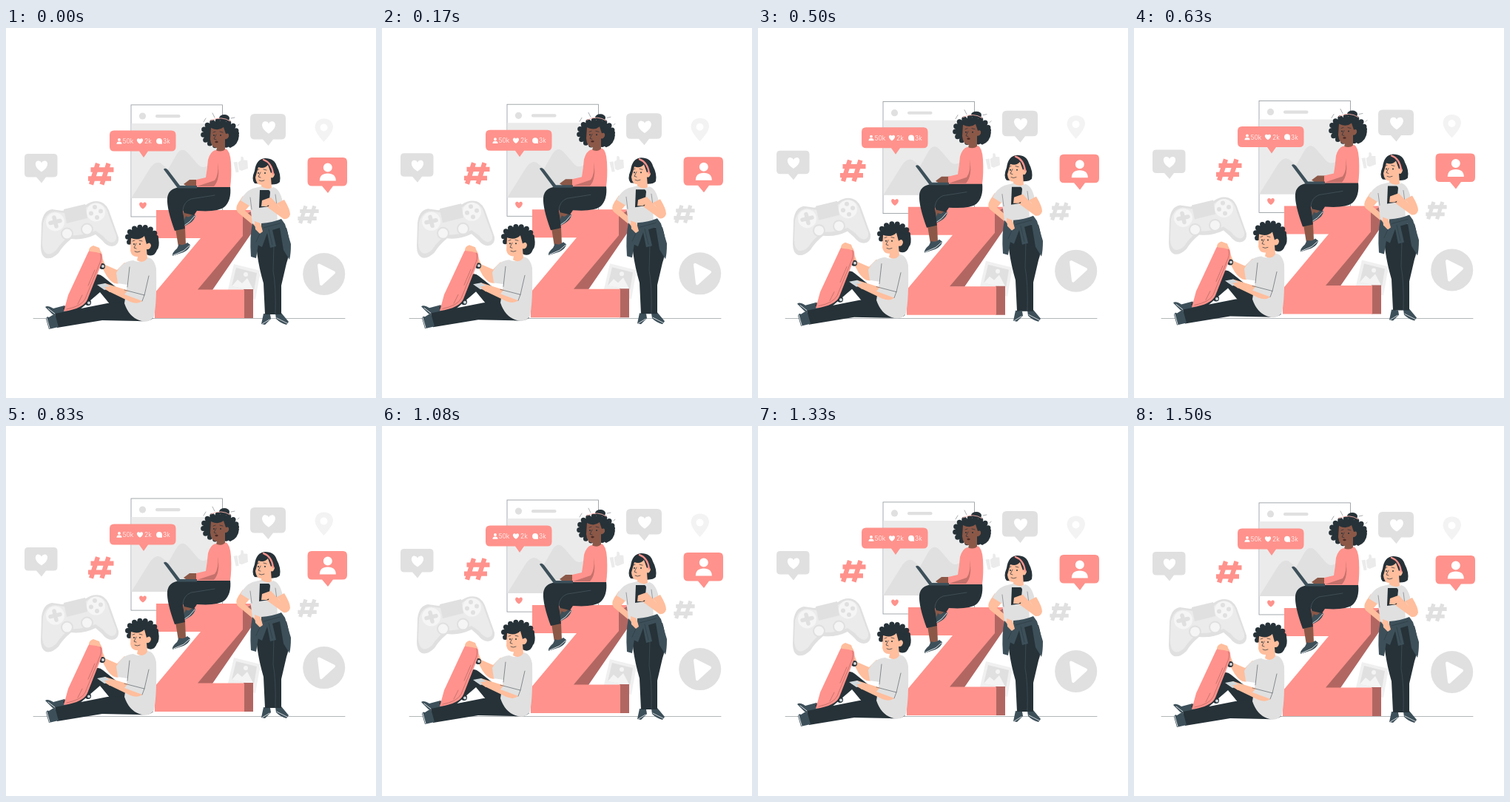
Animation, 500 px wide and 500 px high, one loop 1.54 s. Source, as an HTML page:

```html
<!DOCTYPE html>
<html lang="en">
<head>
<meta charset="utf-8">
<title>Generation Z</title>
<style>
html, body { margin: 0; width: 100%; height: 100%; overflow: hidden; background: #fff; }
svg { display: block; width: 100vw; height: 100vh; }
path, ellipse { stroke-linecap: round; stroke-linejoin: round; }
.pink { fill: #ff928c; }
.shade { fill: #b26662; }
.dark { fill: #263238; }
.slate { fill: #3d505a; }
.hair { fill: #263238; }
.gray { fill: #e0e0e0; }
.pale { fill: #ebebeb; }
.white { fill: #fff; }
.skin { fill: #ffbe9d; }
.brown { fill: #8b5848; }
.line { fill: none; stroke: #263238; stroke-width: .7; }
.curl { stroke: #263238; stroke-width: 7; stroke-dasharray: 0 7.5; }
text { font: 300 8.6px Inter, sans-serif; fill: #fff; }
</style>
</head>
<body>
<svg viewBox="0 0 500 500">
<defs>
  <path id="heart" d="M0 8C-13 0-9-9-4-8Q-1-8 0-5Q1-8 4-8C9-9 13 0 0 8Z"/>
  <path id="user" d="M0-15A6 6 0 0 1 0-3A6 6 0 0 1 0-15ZM-11 9Q-11-1 0-1Q11-1 11 9Z"/>
  <path id="hash" d="M14 0L5 28.500M28.500 0L19.500 28.500M4.500 8.500H35.500M1 20.500H32" fill="none" stroke-width="6.300" style="stroke-linecap:butt"/>
</defs>

<path class="line" stroke-opacity=".5" d="M37 392.500H458"/>

<g id="scene">
  <!-- post card -->
  <rect x="169" y="103.900" width="123.500" height="151.100" fill="#fff" stroke="#8d9498" stroke-width=".8"/>
  <circle class="gray" cx="184.500" cy="119" r="4.600"/>
  <rect class="gray" x="202" y="117" width="33.500" height="4.200" rx="2"/>
  <path class="pale" d="M169.500 129H292V230H169.500Z"/>
  <path class="gray" d="M170 229L195 189Q204 177 212 185L219 191L231 170Q238 160 246 169L259 184Q266 192 275 184L292 208V230H170Z"/>
  <use href="#heart" class="pink" transform="translate(185 240) scale(.56)"/>

  <!-- bubbles -->
  <path class="gray" d="M30 170H64.500Q69.500 170 69.500 175V196.500Q69.500 201.500 64.500 201.500H54L48 209.500L41 201.500H30Q25 201.500 25 196.500V175Q25 170 30 170Z"/>
  <use href="#heart" class="white" transform="translate(48 187) scale(.93)"/>
  <path class="gray" d="M336 116H372Q378 116 378 122V144.500Q378 150.500 372 150.500H361L354.500 159L347 150.500H336Q330 150.500 330 144.500V122Q330 116 336 116Z"/>
  <use href="#heart" class="white" transform="translate(355 134.500) scale(1.02)"/>
  <path class="pink" d="M413 175H455.500Q461 175 461 181V207.500Q461 213.500 455 213.500H442L435 223L427 213.500H413.500Q407.500 213.500 407.500 207.500V181Q407.500 175 413 175Z"/>
  <use href="#user" class="white" transform="translate(434.800 197.500)"/>
  <path class="pink" d="M146 138.500H223.500Q229.500 138.500 229.500 144.500V160.500Q229.500 166.500 223.500 166.500H192L186 175L180 166.500H146Q140 166.500 140 160.500V144.500Q140 138.500 146 138.500Z"/>
  <use href="#user" class="white" transform="translate(153 153.800) scale(.32)"/>
  <use href="#heart" class="white" transform="translate(181 153) scale(.47)"/>
  <circle class="white" cx="207" cy="152.800" r="3.900"/>
  <path class="white" d="M207 156L211 157L210.500 152Z"/>
  <text x="157.500" y="156.200">50k</text>
  <text x="187" y="156.200">2k</text>
  <text x="212" y="156.200">3k</text>

  <use href="#hash" stroke="#ff928c" transform="translate(110 183)"/>
  <use href="#hash" stroke="#e0e0e0" transform="translate(393.500 240.500) scale(.82)"/>
  <path fill="#f3f3f3" fill-rule="evenodd" d="M429.500 122.500Q442 123 442 134.500Q441 142 429.500 154Q418 142 417.500 134.500Q418 123 429.500 122.500ZM429.500 129.500A5 5 0 1 0 429.500 139.500A5 5 0 1 0 429.500 129.500Z"/>
  <circle class="gray" cx="429.700" cy="332.500" r="28.500"/>
  <path fill="#fff" stroke="#fff" stroke-width="4" d="M423 320.500L443 330.500L426 346Z"/>
  <path class="pale" transform="rotate(-9 318 184)" d="M308 180H313V194H309ZM314 181L318 179L319 174Q323 173 322 179L327 180L326 191L317 193L314 191Z"/>

  <!-- gamepad -->
  <path class="gray" d="M48 264Q50 247 62 245L76 247L108 239Q118 232 128 235Q137 238 141 252L152 283Q153 294 143 295Q136 295 130 287L121 279Q105 287 88 285Q77 294 71 304Q62 313 54 311Q47 308 47 296Z"/>
  <path class="pale" d="M50 264Q54 249 66 248L78 250L108 243Q118 235 128 238Q136 241 139 254L149 281Q150 289 143 290Q137 289 131 281L121 274Q105 281 87 280Q75 289 68 300Q61 307 55 305Q49 302 49 290Z"/>
  <path class="gray" d="M78 245L107 238L110 257L82 264Z"/>
  <circle cx="66.500" cy="262" r="12.500" fill="#f5f5f5"/>
  <circle cx="121.500" cy="249" r="12.500" fill="#f5f5f5"/>
  <path d="M60 263.500L73 260.500M65 256L68 268" stroke="#e0e0e0" stroke-width="5.500"/>
  <g class="gray"><circle cx="120" cy="242" r="3"/><circle cx="115" cy="250.500" r="3"/><circle cx="128" cy="247.500" r="3"/><circle cx="123" cy="256" r="3"/></g>
  <g fill="#f5f5f5" stroke="#e0e0e0" stroke-width="2"><circle cx="82.500" cy="278" r="7.500"/><circle cx="109.500" cy="272" r="7.500"/></g>

  <!-- snapshot and letter -->
  <path fill="#f0f0f0" d="M308 319L344 328L337 367L299 358Z"/>
  <path class="gray" d="M311 324L339 331L335 355L305 349Z"/>
  <path fill="#f4f4f4" d="M305 349L313 340L319 345L326 338L335 355Z"/>
  <circle cx="324" cy="333" r="3" fill="#f4f4f4"/>
  <path class="shade" d="M319 254L334 246V274L279 354H258ZM321 353H334V392H321Z"/>
  <path class="pink" d="M203 246H333L320 255V281L259 353.500H322V392H201V358L263 284H203Z"/>

  <!-- woman with laptop -->
  <path class="brown" d="M240 246H255L249 260L239 265ZM229 271H242L243 292L233 296Z"/>
  <path class="slate" d="M234 272Q233 268 240 261L243 254Q247 258 252 251L256 253Q255 260 248 264ZM225 308Q224 304 231 298L234 292Q239 295 245 290L249 293Q248 299 240 303Z"/>
  <path d="M235 271L248 262L255 254M226 307L240 301L248 294" fill="none" stroke="#dfe3e5" stroke-width="1"/>
  <path class="dark" d="M272 214H303Q305 233 295 242Q286 249 258 247L254 253L241 250L239 246L242 271L228 274Q217 244 218 230Q219 217 235 215Z"/>
  <path d="M239 246Q240 235 250 231L282 226" fill="none" stroke="#4b5a61" stroke-width=".7"/>
  <ellipse class="hair curl" cx="289" cy="142.500" rx="22.500" ry="17"/>
  <ellipse class="hair" cx="295" cy="122" rx="7" ry="5"/>
  <path class="hair" d="M302 140L315 145Q314 158 303 162L296 158Z"/>
  <path class="line" style="stroke-width:.4" d="M267 127L270 122M282 121L279 115M304 122L309 121M313 132L315 130"/>
  <path d="M277 125Q291 118 303 126" fill="none" stroke="#ffb3ae" stroke-width=".9"/>
  <path class="brown" d="M277 135Q287 140 294 134L297 143Q302 141 301 147Q299 151 296 150L296 166Q290 171 284 166L285 162Q277 162 276 150Z"/>
  <path class="line" d="M280 141L283 140M289 140L293 141M284 144L281 150L284 151"/>
  <circle class="hair" cx="281" cy="145" r="1"/><circle class="hair" cx="290" cy="145" r="1"/>
  <ellipse cx="284.500" cy="154" rx="2.200" ry="1.300" fill="#4d2b26"/>
  <path class="brown" d="M259 205L248 205L240 211L246 215H260Z"/>
  <path class="pink" d="M283 165Q292 169 297 163Q303 166 304 182Q305 202 303 215H257V205L270 202Q272 190 273 178Q276 167 283 165Z"/>
  <path d="M286 182Q288 198 282 206L258 214H281Q290 204 286 182Z" class="shade" opacity=".75"/>
  <path class="slate" d="M213 191Q215 188 219 192L235 213H258V216.500H232Z"/>

  <!-- man with skateboard -->
  <path class="skin" d="M127 303L134 320L150 327L160 317L168 324L153 345Q145 348 136 335L122 309Z"/>
  <path class="slate" d="M53 377Q56 374 64 379L79 375L85 382L78 388L63 387Z"/>
  <path class="dark" d="M77 379L116 338Q123 329 131 336L177 373L174 393L155 391L127 357L91 388Z"/>
  <path class="dark" d="M66 386L137 372Q160 370 171 372L199 392Q195 397 178 396L130 395L69 405Z"/>
  <path class="slate" d="M54 393Q55 389 58 391L66 386L71 404L58 407Z"/>
  <path d="M55 392L59 406M57 379L66 386" stroke="#dfe3e5" stroke-width="1"/>
  <circle class="dark" cx="130" cy="322" r="4"/><circle class="dark" cx="111" cy="371" r="4"/>
  <circle cx="131" cy="322" r="2" fill="#cfd8dc"/><circle cx="112" cy="371.500" r="2" fill="#cfd8dc"/>
  <path class="pink" d="M111 303Q116 294 125 299Q132 304 130 316L110 367Q105 379 78 383L84 361Z"/>
  <path d="M127 304Q130 309 127 317L107 366Q102 376 82 380M120 327L111 348M103 361L97 373" fill="none" stroke="#b26662" stroke-width=".7"/>
  <path class="skin" d="M112 301Q112 296 118 294L126 297L129 305L122 303L114 302Z"/>
  <path class="gray" d="M172 314Q181 319 190 310Q200 310 203 325Q204 370 200 390Q193 400 180 395Q166 390 160 372L164 347L151 345L149 331Q157 315 172 314Z"/>
  <ellipse class="hair curl" cx="183.500" cy="283" rx="19" ry="14"/>
  <path class="hair" d="M190 280L206 284Q208 296 204 300Q200 311 190 306Z"/>
  <path class="skin" d="M169 284Q180 288 187 281L190 292Q195 288 196 294Q195 300 190 299L191 311Q186 319 177 314L178 309Q170 310 168 301Z"/>
  <path class="line" d="M171 288L174 287M180 287L184 288M176 291L173 297L176 298M174 302Q177 304 181 302"/>
  <circle class="hair" cx="173" cy="292" r="1"/><circle class="hair" cx="181" cy="292" r="1"/>
  <path class="skin" d="M179 353L184 369Q178 374 168 370L141 357L126 349L134 345L150 350L166 355Z"/>
  <path class="gray" d="M179 322L199 321L195 360L187 370L160 360L166 353L174 353Z"/>
  <path class="line" style="stroke-width:.5" d="M167 323L164 350M193 335L187 361L160 354M187 361L184 369"/>
  <path fill="#cfd8dc" d="M123 347L134 345L143 351L133 354Z"/>
  <path class="skin" d="M133 350L146 349L151 354L140 357Z"/>

  <!-- woman with phone -->
  <path class="slate" d="M348 386L357 387L358 393L350 401L345 400ZM364 386L372 385L382 397L379 401Q371 399 365 393Z"/>
  <path d="M346 400L356 394M366 392L380 399" stroke="#dfe3e5" stroke-width=".9"/>
  <path class="dark" d="M338 270H379Q387 296 379 318L372 348V387H350L348 345Q336 304 338 270Z"/>
  <path d="M362 293L361 328Q365 349 364 386" fill="none" stroke="#46545b" stroke-width=".7"/>
  <path class="hair" d="M336 193Q338 177 350 176Q363 176 366 187Q372 198 370 208Q366 213 351 211L336 210Q331 205 336 193Z"/>
  <path class="skin" d="M341 188Q349 191 354 185L358 196Q362 193 363 198Q361 204 358 202L359 216Q352 221 345 216V212Q338 212 337 202Z"/>
  <path d="M348 178Q359 182 361 197" fill="none" stroke="#ff928c" stroke-width="2.300"/>
  <path class="line" d="M339 192L342 191M348 191L352 192M344 195L341 201L344 202M342 206Q345 208 349 206"/>
  <circle class="hair" cx="341" cy="196" r="1"/><circle class="hair" cx="350" cy="196" r="1"/>
  <path class="skin" d="M320 227L329 240L323 247L343 264L347 274L342 277L336 268L313 249Q309 244 314 236Z"/>
  <path class="gray" d="M333 217L345 214Q353 220 361 215Q370 217 374 235L366 241L367 264L333 265L330 241L317 233Q323 221 333 217Z"/>
  <path class="line" style="stroke-width:.4" d="M330 229L332 245M364 225L366 240"/>
  <path class="skin" d="M366 237L376 232Q384 245 384 252Q382 259 375 258L353 242L347 240L348 230L358 229L372 244Z"/>
  <path class="dark" d="M343 219L355 219Q357 220 357 222L355 241L342 243Z"/>
  <path class="skin" d="M346 233L357 229L361 236L352 241L345 241Z"/>
  <path class="slate" d="M345 264Q360 263 372 258L377 265L385 292Q385 306 383 313L375 300L370 270L360 273L365 295L357 297L353 277L346 296L336 291L345 275Z"/>
  <path class="slate" d="M333 264L339 271L346 275L341 292L338 311L331 309Q329 282 333 264Z"/>
  <path class="skin" d="M336 261L344 264L347 275L343 278L337 272Z"/>
  <path class="line" style="stroke-width:.5" d="M348 270L370 264M355 272L360 293M343 278L338 289"/>
</g>
</svg>
<script>
const LOOP = 1540, LIFT = 6;
const scene = document.getElementById('scene');

function draw(now) {
  const phase = now % LOOP / LOOP * 2 * Math.PI;
  const y = LIFT / 2 * (Math.cos(phase) - 1);
  scene.setAttribute('transform', `translate(0 ${y.toFixed(3)})`);
  requestAnimationFrame(draw);
}
draw(performance.now());
</script>
</body>
</html>
```
